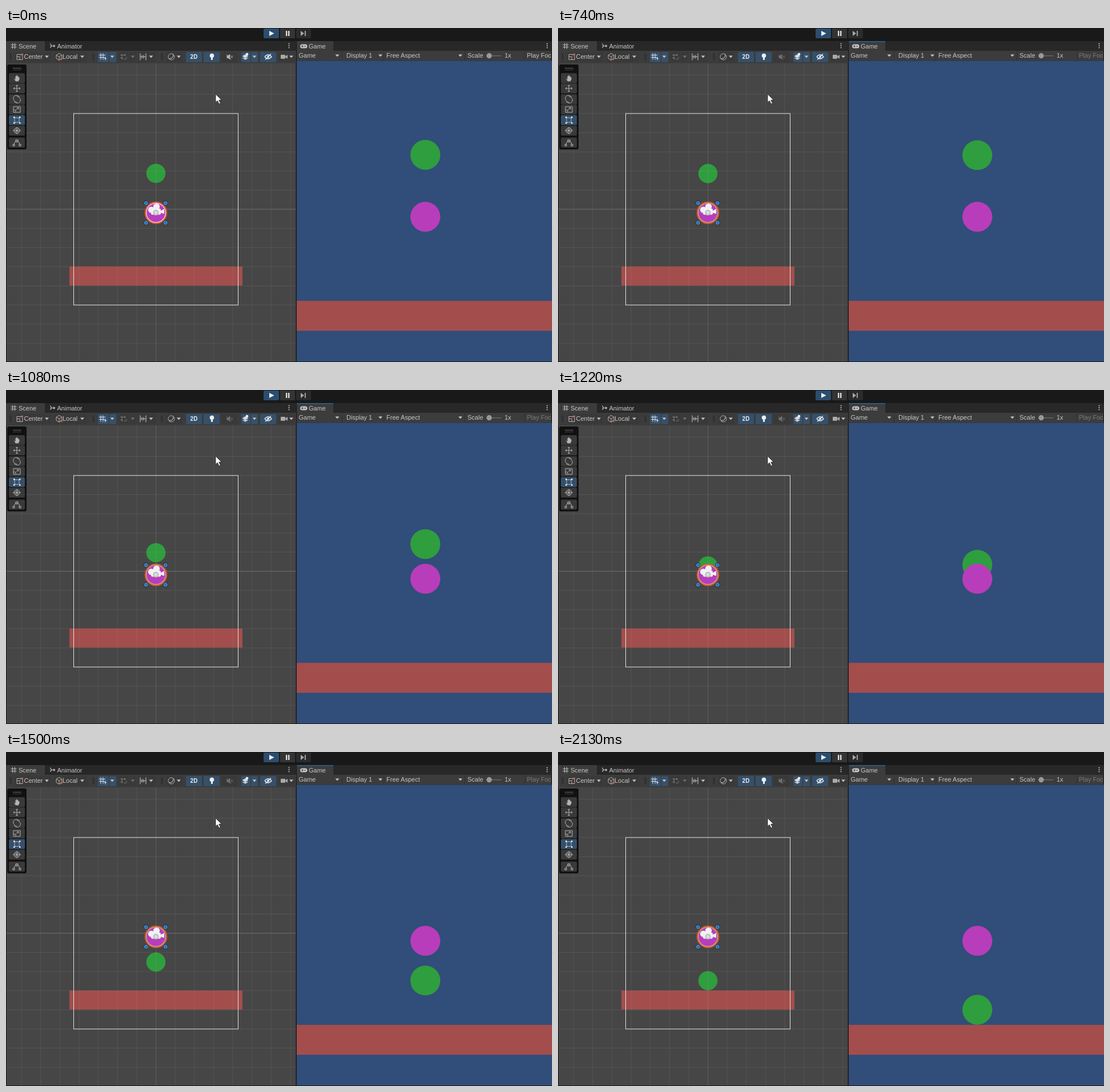
An HTML page that plays this animation: 956 px wide and 586 px high, repeating every 2.66 s.

```html
<!DOCTYPE html>
<html lang="en">
<head>
<meta charset="utf-8">
<title>Falling ball</title>
<style>
  html, body { margin: 0; width: 100%; height: 100%; overflow: hidden; background: #191919; }
  svg { display: block; width: 956px; height: 586px; }
  text { font: 11px "Liberation Sans", Arial, sans-serif; fill: #c6c6c6; }
  .icon { fill: none; stroke: #b4b4b4; }
  .dim { opacity: .4; }
  .solid { fill: #c4c4c4; stroke: none; }
</style>
</head>
<body>
<svg id="stage" viewBox="0 0 956 586"></svg>
<script>
const LOOP = 2660, FOCUS = 540;
const UNIT = 52.8, START = 222.5, REST = 452.2;
const SCALE = 33.6 / UNIT;
const BLUE = '#36506a', GREEN = '#2f9e3e', PINK = '#b83dbb', RED = '#a34e4d';

const rect = (x, y, w, h, fill, more = '') =>
  `<rect x="${x}" y="${y}" width="${w}" height="${h}" fill="${fill}" ${more}/>`;
const disc = (x, y, r, fill, more = '') =>
  `<circle cx="${x}" cy="${y}" r="${r}" fill="${fill}" ${more}/>`;
const label = (x, y, s, more = '') => `<text x="${x}" y="${y}" ${more}>${s}</text>`;
const icon = (x, y, d, more = '') =>
  `<path class="icon" transform="translate(${x} ${y})" d="${d}" ${more}/>`;
const arrow = (x, y, more = '') => icon(x, y, 'M-3.5-2h7L0 2z', 'class="solid" ' + more)
  .replace('class="icon" ', '');
const button = (x, w, on) =>
  rect(x, 42, w, 18, on ? BLUE : '#393939', 'rx="2"');
const kebab = x => [27.5, 31, 34.5].map(y => disc(x, y, 1.1, '#c4c4c4')).join('');
const ring = r => `M${-r} 0a${r} ${r} 0 1 0 ${2 * r} 0a${r} ${r} 0 1 0 ${-2 * r} 0`;

function playBar() {
  return rect(451, 1, 27, 17, '#2c4d6e', 'rx="2"') + rect(480, 1, 26, 17, '#343434') +
    rect(508, 1, 26, 17, '#2b2b2b', 'rx="2"') +
    '<path d="M461 5l8.500 4.500-8.500 4.500z" fill="#e8f2fb"/>' +
    rect(490, 5, 2.4, 9, '#ddd') + rect(494, 5, 2.4, 9, '#ddd') +
    '<path d="M516 5l6 4.500-6 4.500z" fill="#a8a8a8"/>' + rect(523, 5, 1.8, 9, '#a8a8a8');
}

function tabs() {
  return rect(0, 23, 508, 17, '#282828') + rect(509, 23, 447, 17, '#282828') +
    rect(0, 23, 68, 17, '#3c3c3c') + rect(509, 23, 64, 17, '#3c3c3c') +
    rect(509, 23, 64, 1.5, '#2f628f', 'id="focus"') +
    icon(13.500, 31.500, 'M-5-2H5M-5 2H5M-2-5V5M2-5V5', 'stroke-width="1.2"') +
    label(22, 36, 'Scene') +
    icon(81.500, 31.500, 'M-4-4l2 4-2 3M-2 0H4M2-2l2 2-2 2', 'stroke-width="1.4"') +
    label(89.500, 36, 'Animator') + kebab(495.500) +
    rect(515, 28.5, 12.5, 7, '#c4c4c4', 'rx="3.500"') +
    '<path d="M517 32h4M519 30v4" stroke="#3c3c3c"/>' +
    disc(523.5, 32, 1, '#3c3c3c') + label(530, 36, 'Game') + kebab(947.5);
}

function sceneBar() {
  const separator = x => icon(x, 50.500, 'M-1-6V6M1-6V6', 'stroke="#292929" style="stroke:#292929"');
  return rect(0, 40, 508, 22, '#3c3c3c') + [8, 153, 273].map(separator).join('') +
    [[15, 64], [84, 58], [161, 19, 1], [181, 12, 1], [197, 18], [216, 12], [232, 30],
     [280, 29], [315, 28, 1], [346, 28, 1], [377, 28], [412, 16, 1], [429, 12, 1],
     [445, 28, 1], [477, 30]].map(b => button(...b)).join('') +
    icon(24, 50.500, 'M-5-4H5V5H-5zM-5 0H0V5') +
    icon(26.500, 48, 'M-3 3L3-3M0-3H3V0', 'style="stroke:#c95c3c"') +
    label(31.500, 54, 'Center') + arrow(71.500, 50.500) +
    icon(93, 50.500, 'M-5-3L0-6 5-3V3L0 6-5 3zM-5-3L0 0 5-3M0 0V6') +
    disc(97, 54, 2, 'none', 'stroke="#c95c3c"') +
    label(99, 54, 'Local') + arrow(133.500, 50.500) +
    icon(169, 50.500, 'M-6-3H5M-6 1H4M-3-6V5M1-6V5M5 0V6M3 3H7', 'style="stroke:#e0e8f0"') +
    arrow(186, 50.500) +
    icon(205, 50.500, 'M-5-3H5M-5 2H0M-2-5V5M3-5V-1M1 3a3 3 0 0 0 5 0V0', 'class="dim" opacity=".5"') +
    arrow(222, 50.500, 'opacity=".4"') +
    icon(240, 50.500, 'M-5-6V6M5-6V6M-5 0H5M-2-3V3M1-3V3', 'stroke-width="1.2"') + arrow(254, 50.500) +
    icon(289.500, 50.500, ring(5.500)) +
    icon(289.500, 50.500, 'M3-4a5.500 5.500 0 0 1-7 7a5.500 5.500 0 0 0 7-7', 'style="fill:#b4b4b4"') +
    arrow(302.500, 50.500) +
    label(329, 54, '2D', 'text-anchor="middle" style="font-size:10px;font-weight:bold;fill:#e6edf4"') +
    disc(360.500, 48.500, 3.8, '#eee') + rect(359, 52, 3, 4, '#eee') +
    '<g id="mute">' +
    icon(391, 50.500, 'M-4-2H-2L1-4V4L-2 2H-4z', 'style="fill:#b4b4b4"') +
    icon(391, 50.500, 'M3-2l3 4M6-2l-3 4M-5-4L3 5') + '</g>' +
    icon(419, 50.500, 'M-5-1L0-4 5-1 0 2zM-5 2L0 5 5 2', 'style="fill:#d9e0e8"') +
    disc(422, 46, 2.3, '#eef') + arrow(435, 50.500) +
    icon(459, 50.500, 'M-6 0Q0-7 6 0Q0 7-6 0M-5 5L5-5', 'style="stroke:#e2e9ef" stroke-width="1.3"') +
    disc(459, 50.500, 2, '#e2e9ef') +
    rect(481, 47, 8, 7, '#aaa', 'rx="1"') + '<path d="M489 50l4-3v7l-4-3z" fill="#aaa"/>' +
    arrow(499.500, 50.500);
}

function gameBar() {
  return rect(509, 40, 447, 17.5, '#3c3c3c') +
    [588, 661, 803, 908].map(x => rect(x, 40, 1, 17, '#303030')).join('') +
    label(512.5, 52, 'Game') + arrow(580, 48.5) + label(596, 52, 'Display 1') + arrow(655.5, 48.5) +
    label(666, 52, 'Free Aspect') + arrow(795.5, 48.5) + label(808, 52, 'Scale') +
    rect(841, 48, 26, 1.5, '#656565') + disc(846, 48.7, 4.7, '#999') + label(873, 52, '1x') +
    label(912, 52, 'Play Focused', 'id="play"') + rect(955, 40, 1, 18, '#191919');
}

function grid() {
  let d = '';
  for (let i = -7; i <= 7; i++) {
    const x = (262.5 + i * 33.63).toFixed(1), y = (318 + i * 33.6).toFixed(1);
    d += `M${x} 62V585M1 ${y}H507`;
  }
  return `<path d="${d}" stroke="#999" stroke-opacity=".17"/>` +
    '<path d="M1 318H507" stroke="#aaa" stroke-opacity=".3"/>' +
    '<path d="M262.500 62V585" stroke="#999" stroke-opacity=".14"/>';
}

function palette() {
  const tools = [
    [88, 'M-3 5L-6 0-4 0-3 2V-4H-1V-6H1V-4H3V-2H5V2L3 6H-2z', 'style="fill:#b4b4b4;stroke:#383838"'],
    [106, 'M-6 0H6M0-6V6M-4-2L-6 0-4 2M4-2L6 0 4 2M-2-4L0-6 2-4M-2 4L0 6 2 4'],
    [125, 'M-5 2A5 5 0 0 1 3-5M5-2A5 5 0 0 1-3 5M0-5H4V-2M0 5H-4V2'],
    [143, 'M-6-5H6V5H-6zM-6 1H-2V5M-1 0L3-3M0-3H3V0'],
    [161.5, 'M-4-4H4V4H-4z', 'style="stroke:#dfe6ee" stroke-dasharray="2 1"'],
    [180, ring(5) + 'M-7 0H7M0-6V6M-3-3L3 3M3-3L-3 3'],
    [201, 'M-5 4Q-4-3 0-3Q4-3 5 4' + 'M-2-5H2V-1H-2zM-7 3H-4V6H-7zM4 3H7V6H4z']
  ];
  return rect(2, 64, 34, 149, '#111', 'rx="3"') +
    rect(12, 70, 15, 1, '#686868') + rect(12, 73, 15, 1, '#444') +
    tools.map(([y, d, more], i) =>
      rect(5, y - 8.7, 28, 17.4, i === 4 ? BLUE : '#393939', 'rx="2"') + icon(19, y, d, more)
    ).join('') +
    [[13, 155.5], [23, 155.5], [13, 165.5], [23, 165.5]]
      .map(([x, y]) => rect(x, y, 2.500, 2.500, '#e3ebf3')).join('');
}

function selection() {
  const corners = [[245.3, 307.3], [279.3, 307.3], [245.3, 341.7], [279.3, 341.7]];
  return disc(262.5, 324.3, 18.6, PINK, 'stroke="#d8592b" stroke-width="2.4"') +
    disc(262.5, 324.3, 16.9, 'none', 'id="ring" stroke-width="1.200"') +
    disc(254.5, 319, 5.6, '#f1f1f1') + disc(263.5, 313.6, 5.7, '#f1f1f1') +
    rect(254, 317, 17, 10.5, '#f1f1f1', 'rx="2"') +
    '<path d="M270 321l7-3.500v8.500l-7-2z" fill="#f1f1f1"/>' +
    disc(262.5, 324, 4, '#ddd', 'stroke="#b5bcc4" stroke-width="2"') +
    corners.map(([x, y]) => disc(x, y, 4.2, '#111b2a') +
      disc(x, y, 3.1, '#2672bd', 'stroke="#78aee0" stroke-width=".8"')).join('');
}

stage.innerHTML =
  rect(0, 0, 956, 586, '#191919') + playBar() + tabs() + sceneBar() + gameBar() +
  rect(1, 62, 506.500, 523, '#464646') +
  disc(262.5, 0, 16.8, GREEN, 'id="sceneBall"') + rect(111, 418.5, 303, 33.3, RED) + grid() +
  rect(118.5, 150, 288, 336, 'none', 'stroke="#e4e4e4"') + selection() + palette() +
  '<path d="M367 116v14.500l3.300-3 2.700 5.800 2.500-1.100-2.700-5.700h4.600z" fill="#fff" stroke="#222" stroke-width=".8"/>' +
  rect(509, 57.5, 447, 527.5, '#314d79') +
  disc(734.2, 0, 26.2, GREEN, 'id="gameBall"') + disc(734.2, 331.3, 26.2, PINK) +
  rect(509, 478.7, 447, 52.5, RED);

const $ = id => document.getElementById(id);

// The screen refreshes every 70 ms, with one short interval before 940.
function snap(t) {
  const base = t < 940 ? 740 : 940;
  return base + Math.floor((t - base) / 70) * 70;
}

// Physics advances in 20 ms steps: free fall, then the overlap with the floor eases out.
function ballY(t) {
  if (t < 740) return START;
  const time = snap(Math.min(t, 2130));
  const rate = time < 1080 ? 11 / 200 : 13 / 280;
  const n = Math.round(21 + (time - 1080) * rate);
  const fall = k => START + 9.81 * UNIT * 0.0004 * k * (k + 1) / 2;
  return n <= 47 ? fall(n) : REST + (fall(47) - REST) * 0.8 ** (n - 47);
}

function draw(now) {
  const t = now % LOOP, y = ballY(t), on = t >= FOCUS;
  $('gameBall').setAttribute('cy', y);
  $('sceneBall').setAttribute('cy', 318 + (y - 321.5) * SCALE);
  $('focus').setAttribute('opacity', on ? 1 : 0);
  $('mute').setAttribute('opacity', on ? .45 : 1);
  $('play').setAttribute('opacity', on ? .45 : 1);
  $('ring').setAttribute('stroke', on ? '#b9b58f' : '#f3dfea');
}

const begin = performance.now();
function tick() {
  draw(performance.now() - begin);
  requestAnimationFrame(tick);
}
tick();
</script>
</body>
</html>
```
